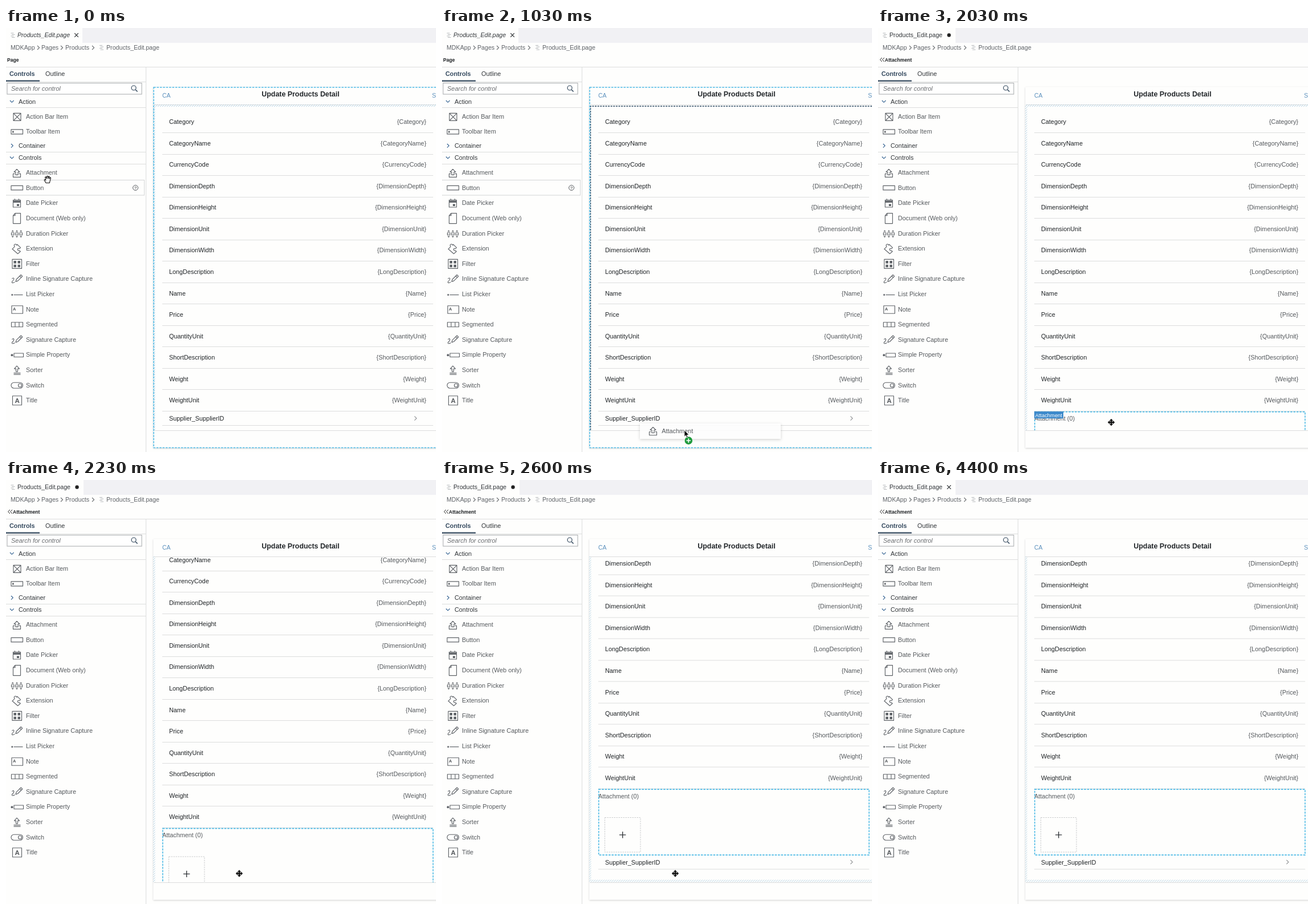
These frames come from a looping animation (754x743 px, 5.2 s). An HTML page:

```html
<!DOCTYPE html>
<html lang="en">
<head>
<meta charset="utf-8">
<title>Page editor: drag a control</title>
<style>
html, body { margin: 0; width: 100%; height: 100%; overflow: hidden; background: #fefefd; }
svg { display: block; }
text { font: 10.85px "Liberation Sans", Arial, sans-serif; fill: #32363a; white-space: pre; }
.crumb text { font-size: 10.65px; fill: #5f6368; }
.item text, .value, .muted { fill: #55595d; }
.key { fill: #1f2326; }
.small { font-size: 8.6px; font-weight: bold; fill: #1d2023; }
.line { stroke: #dcdddd; fill: none; }
.icon { stroke: #5f6368; stroke-width: 1.15; fill: none; stroke-linejoin: round; }
.solid { fill: #5f6368; stroke: none; }
.chev { stroke: #6a6d70; stroke-width: 1.1; fill: none; }
.blue { stroke: #2f5f8f; }
.pick { stroke: #4fbbe6; stroke-width: 1.6; stroke-dasharray: 3.6 1.8; fill: none; }
.drop { stroke: #2d4a63; stroke-width: 1.4; stroke-dasharray: 3 1.6; fill: none; }
</style>
</head>
<body>
<svg id="stage" width="754" height="743" viewBox="0 0 754 743">
  <defs>
    <clipPath id="listClip"><rect x="258" y="134" width="496" height="571"/></clipPath>
    <pattern id="hatch" width="4" height="4" patternUnits="userSpaceOnUse">
      <path d="M-1 1L1 -1M0 4L4 0M3 5L5 3" stroke="#a9cbdf" stroke-width=".9"/>
    </pattern>
    <filter id="soft" x="-10%" y="-40%" width="120%" height="200%">
      <feDropShadow dx="0" dy="1.5" stdDeviation="2.5" flood-color="#000" flood-opacity=".2"/>
    </filter>
    <filter id="cardShadow" x="-5%" y="-5%" width="110%" height="110%">
      <feDropShadow dx="0" dy="1" stdDeviation="1.6" flood-color="#000" flood-opacity=".22"/>
    </filter>
    <g id="doc"><path d="M0 0h5M1.5 2.5h5.5M0 5h5M1.5 7.5h5.5" stroke="#b3b6b9" fill="none"/></g>
    <g id="upload" class="icon"><path d="M-6.5 1v6h13v-6h-3M-6.5 1h3M-2 3v-5h-3l5 -5l5 5h-3v5z"/></g>
  </defs>

  <rect width="754" height="743" fill="#fefefd"/>

  <!-- file tab -->
  <rect id="tabBar" y="0" width="754" height="26" fill="#f1f1f4"/>
  <use href="#doc" x="8.5" y="9"/>
  <text id="tabName" x="20" y="16.4">Products_Edit.page</text>
  <path id="tabClose" d="M-3.3 -3.3l6.6 6.6m0 -6.6l-6.6 6.6" stroke="#2b2e31" stroke-width="1.2"/>
  <circle id="tabDirty" cx="124.5" cy="12.5" r="3.2" fill="#222"/>

  <!-- breadcrumb -->
  <g class="crumb">
    <text x="8" y="38.4">MDKApp</text><text x="62" y="38.4">Pages</text>
    <text x="104" y="38.4">Products</text><text x="176" y="38.4">Products_Edit.page</text>
    <path class="chev" d="M55 31l3.5 3.5l-3.5 3.5M96 31l3.5 3.5l-3.5 3.5M151 31l3.5 3.5l-3.5 3.5"/>
    <use href="#doc" x="164" y="30.5"/>
  </g>
  <text id="pageName" class="small" x="2" y="58.6">Page</text>
  <g id="backName">
    <path d="M7 52l-3.3 3.5l3.3 3.5M11 52l-3.3 3.5l3.3 3.5" fill="none" stroke="#222"/>
    <text class="small" x="12" y="58.6">Attachment</text>
  </g>

  <!-- side panel -->
  <path class="line" d="M0 68.5H754M245.5 68V743M0 94.5H245M0 139.5H245M0 217.5H245M0 238.5H245"/>
  <text x="6" y="84" font-weight="bold" style="font-weight:bold;fill:#354a5f">Controls</text>
  <text x="69" y="84">Outline</text>
  <rect y="91.5" width="59" height="2.2" fill="#354a5f"/>
  <rect x="2" y="96.5" width="236" height="19.5" fill="#fff" stroke="#a5a8ab"/>
  <text x="9" y="110" style="font-size:11px;font-style:italic;fill:#6a6d70">Search for control</text>
  <path d="M227.2 108.2l3.3 3.3" stroke="#354a5f" stroke-width="1.6"/>
  <circle cx="224" cy="105" r="4" fill="none" stroke="#354a5f" stroke-width="1.2"/>
  <text x="22" y="132.6" font-size="10.6">Action</text>
  <text x="22" y="210">Container</text>
  <text x="22" y="231">Controls</text>
  <path class="chev blue" d="M7 127l3.3 3.3l3.3 -3.3M9 203l3.3 3.3l-3.3 3.3M7 225.5l3.3 3.3l3.3 -3.3"/>
  <g id="hover">
    <rect x="-1" y="266.5" width="243.5" height="26.5" fill="none" stroke="#d3d5d6"/>
    <circle cx="227" cy="280" r="4.5" fill="none" stroke="#55595d"/>
    <text x="227" y="282.8" text-anchor="middle" style="font-size:7.5px">?</text>
  </g>
  <g id="items" class="item"></g>

  <!-- page preview -->
  <rect x="258.5" y="103.5" width="520" height="632" fill="#fefefd" filter="url(#cardShadow)"/>
  <text x="274" y="122.2" style="font-size:10.5px;fill:#5b90bd">CA</text>
  <text x="747" y="122.2" style="font-size:10.5px;fill:#5b90bd">SA</text>
  <text x="516.5" y="119.8" text-anchor="middle" style="font-size:12.4px;font-weight:bold;fill:#22262a">Update Products Detail</text>
  <path class="line" d="M259 134.5H754M259 705.5H754"/>
  <g clip-path="url(#listClip)">
    <g id="list">
      <path id="band" fill="url(#hatch)" d="M258 134H754V138H261.5V831H754V835H258Z"/>
      <g id="rows"></g>
      <g id="supplier">
        <text class="key" x="286" y="688">Supplier_SupplierID</text>
        <path class="chev" d="M716.3 680.3l3.6 3.7l-3.6 3.7" stroke-opacity=".75"/>
        <path class="line" d="M274 696.5H749"/>
      </g>
      <g id="block">
        <text class="muted" x="274" y="688">Attachment (0)</text>
        <rect x="285.5" y="722" width="62.5" height="60.5" fill="none" stroke="#c9cbcc" stroke-dasharray="2.5 1.5"/>
        <path d="M311 752.4h11.4M316.7 746.7v11.4" stroke="#32363a" stroke-width="1.4"/>
        <rect id="selected" class="pick" x="274.8" y="672.6" width="474" height="115"/>
        <g id="tag">
          <rect x="274" y="672" width="51" height="12.2" fill="#3d8acb"/>
          <text x="275.5" y="681.8" style="font-size:9.4px;fill:#fff">Attachment</text>
        </g>
      </g>
    </g>
    <path id="target" class="drop" d="M754 137H260.5V705"/>
  </g>
  <rect id="frame" class="pick" x="259" y="104" width="520" height="631.5"/>

  <!-- dragged control -->
  <g id="ghost">
    <rect width="247" height="27" fill="#fff" fill-opacity=".88" filter="url(#soft)"/>
    <use href="#upload" x="23" y="13.5"/>
    <text class="muted" x="38.3" y="17">Attachment</text>
    <g id="plus">
      <circle cx="85.3" cy="30" r="7.2" fill="#1f9a3c" stroke="#fff" stroke-width=".8"/>
      <path d="M81.5 30h7.6M85.3 26.2v7.6" stroke="#fff" stroke-width="1.7"/>
    </g>
    <path d="M78 12v11.2l2.6 -2.4l1.7 4l1.9 -.8l-1.7 -3.9h3.6z" fill="#000" stroke="#fff" stroke-width=".8"/>
  </g>

  <g id="hand">
    <path d="M-3 6.5L-5.8 1.8Q-6 .2 -4.4 .6L-3.2 2L-4.3 -3.2Q-3.6 -5 -2.5 -3.4L-1.7 -1L-1.5 -5Q-.4 -6.5 .4 -5L.7 -1.2L1.6 -4.6Q2.9 -5.8 3.2 -4.2L2.9 -.7L4.3 -2.9Q5.7 -3.4 5.4 -1.6L4 3.5L3.4 6.5Z" fill="#fff" stroke="#111" stroke-width="1.1" stroke-linejoin="round"/>
  </g>
  <g id="move">
    <path d="M0 -6l2.7 3h-1.7v2h2v-1.7l3 2.7l-3 2.7v-1.7h-2v2h1.7l-2.7 3l-2.7 -3h1.7v-2h-2v1.7l-3 -2.7l3 -2.7v1.7h2v-2h-1.7z" fill="#111" stroke="#111" stroke-width=".5"/>
  </g>
</svg>
<script>
const $ = id => document.getElementById(id);

// Icons are drawn around their own centre; the second path is filled.
const PEN = ["M-2 5l1.2 -4l8 -8l2.6 2.6l-8 8zM5 -5l2.6 2.6M-8.5 0q3 -3 3.4 0q-.4 3 -3 4.5q-1.5 3 1.5 2.5l3 -1", ""];
const ICONS = {
  "Action Bar Item": ["M-6 -5.5h13v13h-13zM-6 -5.5l13 13m0 -13l-13 13", ""],
  "Toolbar Item": ["M-10 -3.5h20.5v8h-20.5z", "M-8 -.8h2.8v2.8h-2.8z"],
  "Attachment": null,
  "Button": ["M-10 -3.5h20.5v7.5h-20.5z", ""],
  "Date Picker": ["M-6.5 -5h13v12.5h-13zM-3.5 -7.5v3M3.5 -7.5v3", "M-6.5 -4h13v3.5h-13zM0 2h4v3.5h-4z"],
  "Document (Web only)": ["M-3 -8.5h9.5v18h-13v-14zM-6.5 -4.5h3.5v-4", ""],
  "Duration Picker": ["M-9.5 -1h4.5v4h-4.5zM-2.2 -1h4.5v4h-4.5zM5 -1h4.5v4h-4.5z",
    "M-9.5 -3l2.2 -2.5l2.2 2.5zM-2.2 -3l2.2 -2.5l2.2 2.5zM5 -3l2.2 -2.5l2.2 2.5zM-9.5 5l2.2 2.5l2.2 -2.5zM-2.2 5l2.2 2.5l2.2 -2.5zM5 5l2.2 2.5l2.2 -2.5z"],
  "Extension": ["M-8 1l4 -4q-2 -4 1.5 -4.5q2 0 2.5 2l1 -1.5l5.5 5.5l-2 2q-3 -1 -3.2 1.2q.2 2.5 3 2l2 1.5l-4.5 4.2z", ""],
  "Filter": ["M-8 -7.5h16.5v16h-16.5z", "M-5.5 -5h4.5v4.5h-4.5zM1.5 -5h4.5v4.5h-4.5zM-5.5 1.8h4.5v4.5h-4.5zM1.5 1.8h4.5v4.5h-4.5z"],
  "Inline Signature Capture": PEN,
  "List Picker": ["M-5.5 1.5h16", "M-9.5 .2h2.6v2.6h-2.6z"],
  "Note": ["M-9 -6h19.5v13.5h-19.5z", ""],
  "Segmented": ["M-9.5 -3.5h20v8h-20zM-3 -3.5v8M4 -3.5v8", ""],
  "Signature Capture": PEN,
  "Simple Property": ["M-5 -2.5h16.5v6.5h-16.5z", "M-10.5 .8a2 2 0 1 1 4 0a2 2 0 1 1 -4 0z"],
  "Sorter": ["M-1.5 3v-5h-3l4.5 -5l4.5 5h-3v5zM-5.5 5.5h12M-5.5 8h12", ""],
  "Switch": ["M-5 -4.5h10.5a5 5 0 0 1 0 10h-10.5a5 5 0 0 1 0 -10zM2.5 .5a3 3 0 1 1 6 0a3 3 0 1 1 -6 0z", ""],
  "Title": ["M-7.5 -7.5h16v16h-16z", ""]
};
const LETTERS = { Note: [-7, 2.5, 7.5], Title: [-3.6, 5, 11.5] };

$("items").innerHTML = Object.entries(ICONS).map(([name, art], i) => {
  const y = i < 2 ? 154.8 + i * 26.6 : 253.3 + (i - 2) * 26.6;
  const pic = art
    ? `<path class="icon" d="${art[0]}"/><path class="solid" d="${art[1]}"/>`
    : `<use href="#upload" y="1"/>`;
  const l = LETTERS[name];
  const letter = l ? `<text x="${l[0]}" y="${l[1]}" style="font-size:${l[2]}px;font-weight:bold">A</text>` : "";
  return `<g transform="translate(19 ${y})">${pic}${letter}<text x="16" y="3.8">${name}</text></g>`;
}).join("");

const FIELDS = ("Category CategoryName CurrencyCode DimensionDepth DimensionHeight DimensionUnit DimensionWidth " +
  "LongDescription Name Price QuantityUnit ShortDescription Weight WeightUnit").split(" ");
$("rows").innerHTML = FIELDS.map((f, i) => {
  const y = 168.2 + i * 37.54;
  return `<text class="key" x="286" y="${y}">${f}</text>
    <text class="value" x="737" y="${y}" text-anchor="end">{${f}}</text>
    <path class="line" d="M274 ${Math.round(y + 14.8) + .5}H749"/>`;
}).join("");

const LOOP = 5200;
const SCROLL = [[0, 0], [2230, 62], [2400, 110], [2600, 130.5]];
const GHOST = [[400, 322.5, 723.5], [630, 345, 721.5], [830, 346, 720.5], [1030, 347, 693], [1230, 329, 675.5], [1430, 330, 675.5]];
const CURSOR = [[0, "hand", 73, 265], [60, "hand", 75, 258], [230, "hand", 75, 277], [400],
  [1830, "move", 409, 691], [2230, "move", 409, 689.5], [3600, "move", 418, 642],
  [3800, "move", 350, 629], [4000, "move", 351, 617], [4200, "move", 339, 629], [4400]];

const at = (steps, t) => steps.findLast(s => s[0] <= t) || steps[0];
const show = (id, on) => { $(id).style.display = on ? "" : "none"; };
const place = (id, x, y) => $(id).setAttribute("transform", `translate(${x} ${y})`);

function draw(t) {
  const dropped = t >= 1830, edited = t >= 2030, saved = t >= 3400;
  const dragging = t >= 400 && !dropped, inserted = t >= 1230;

  $("tabBar").setAttribute("x", edited ? 136 : 134);
  $("tabName").style.cssText = edited ? "font-size:10.66px" : "font-size:10.55px;font-style:italic";
  place("tabClose", edited ? 124.5 : 123.5, 12.5);
  show("tabClose", !edited || saved);
  show("tabDirty", edited && !saved);
  show("pageName", !edited);
  show("backName", edited);
  show("hover", !dropped);

  show("frame", !dropped);
  show("band", !dragging);
  show("target", dragging);
  show("block", inserted);
  show("selected", dropped);
  show("tag", edited && t < 2230 || t >= 3800 && t < 4400);
  place("supplier", 0, inserted ? 116 : 0);
  place("list", 0, -at(SCROLL, t)[1]);

  const [, gx, gy] = at(GHOST, t);
  show("ghost", dragging);
  place("ghost", gx, gy);
  show("plus", t >= 1030);

  const [, kind, x, y] = at(CURSOR, t);
  for (const id of ["hand", "move"]) {
    show(id, id === kind);
    if (id === kind) place(id, x, y);
  }
}

const start = performance.now();
function tick() {
  draw((performance.now() - start) % LOOP);
  requestAnimationFrame(tick);
}
tick();
</script>
</body>
</html>
```
